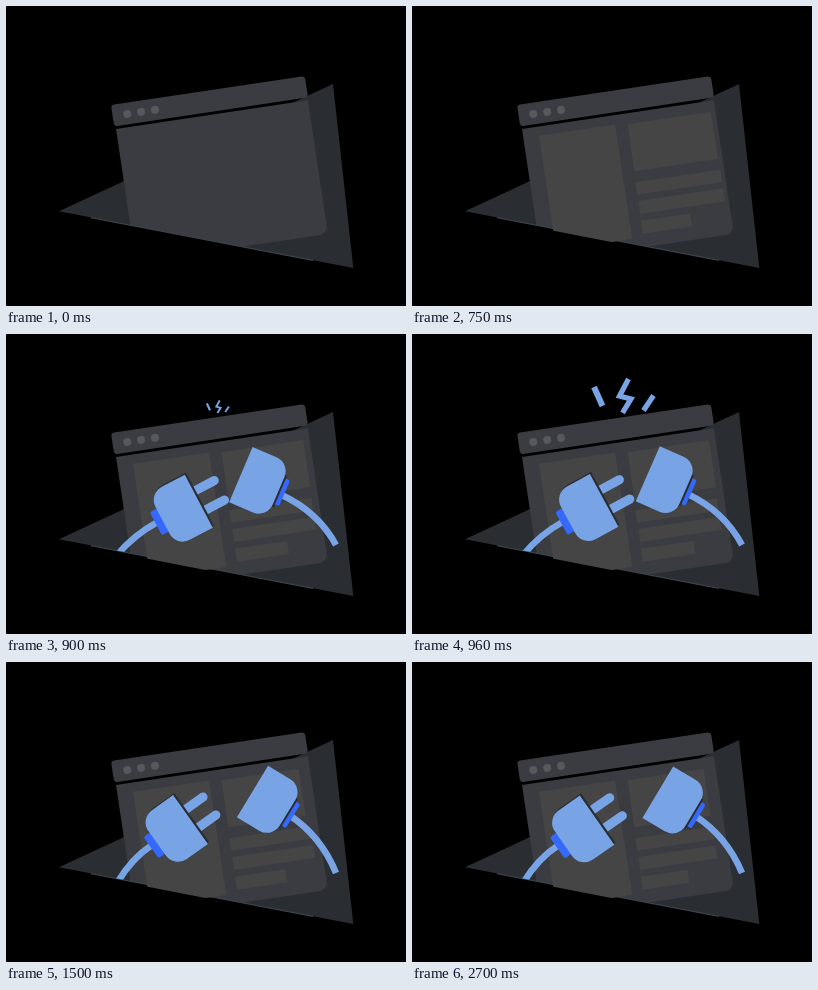
Animation of 400x300 px, one loop 2.73 s. Source, as an HTML page with a canvas:

```html
<!DOCTYPE html>
<html>
<head>
<meta charset="utf-8">
<style>
  html, body { margin: 0; height: 100%; overflow: hidden; background: #000; }
  canvas { display: block; }
</style>
</head>
<body>
<canvas id="stage" width="400" height="300"></canvas>
<script>
const ctx = document.getElementById('stage').getContext('2d');
const LOOP = 2730;
const BLUE = '#78a4e6', COLLAR = '#3469fb', SHADE = '#2a2d31';
const PANEL = '#3a3c41', BLOCK = '#454546', DOT = '#56585c';

const clamp01 = x => Math.min(1, Math.max(0, x));
const mix = (a, b, k) => a + (b - a) * k;
const smooth = x => { x = clamp01(x); return x * x * (3 - 2 * x); };
const span = (t, a, b) => clamp01((t - a) / (b - a));

const TIMES = [750, 840, 960, 1500, 2130, 2700];
function keyed(t, values) {
  let i = 0;
  while (i < TIMES.length - 2 && t > TIMES[i + 1]) i++;
  return mix(values[i], values[i + 1], span(t, TIMES[i], TIMES[i + 1]));
}

function box(x, y, w, h, radius, color) {
  ctx.fillStyle = color;
  ctx.beginPath();
  ctx.roundRect(x, y, w, h, radius);
  ctx.fill();
}

function polyline(points, width, color) {
  ctx.strokeStyle = color;
  ctx.lineWidth = width;
  ctx.beginPath();
  points.forEach(p => ctx.lineTo(...p));
  ctx.stroke();
}

function group(draw) {
  ctx.save();
  draw();
  ctx.restore();
}

// Keeps only what lies above the slanted floor.
function clipFloor(drop) {
  ctx.beginPath();
  ctx.moveTo(0, 0);
  ctx.lineTo(400, 0);
  ctx.lineTo(400, 272.3 + drop);
  ctx.lineTo(0, 194.7 + drop);
  ctx.clip();
}

function windowSpace() {
  ctx.translate(110, 123);
  ctx.rotate(-8.5 * Math.PI / 180);
}

function drawWindow(t) {
  ctx.fillStyle = SHADE;
  ctx.beginPath();
  ctx.moveTo(53, 205.3);
  ctx.lineTo(327, 78);
  ctx.lineTo(347.3, 262);
  ctx.fill();

  group(() => {
    clipFloor(0.3);
    windowSpace();
    box(-1.4, -24.5, 196, 21.6, 3, PANEL);
    for (let i = 0; i < 3; i++) box(9.4 + 14 * i, -17.2, 8, 8, 4, DOT);
    box(0, 0, 194, 135, [0, 0, 8, 0], PANEL);
  });
  polyline([[85, 211.6], [307, 254.3]], 1.2, '#3a444a');

  group(() => {
    clipFloor(2.6);
    windowSpace();
    ctx.globalAlpha = clamp01(t / 720);
    const lineWidth = keyed(t, [86, 83.5, 82.5, 82, 79, 78]);
    box(15.8, 9.2, 77, 116, 0, BLOCK);
    box(105, 10.8, keyed(t, [84.4, 83, 82.5, 78, 77.5, 77]), 47.7, 0, BLOCK);
    box(104.2, 69.5, lineWidth, 12.5, 0, BLOCK);
    box(104.2, 88.4, lineWidth, 13, 0, BLOCK);
    box(104.2, 108.4, keyed(t, [49.5, 52, 53, 51, 48, 47]), 13, 0, BLOCK);
  });
}

function drawCord(x0, y0, cx, cy, x1, y1) {
  ctx.strokeStyle = BLUE;
  ctx.lineWidth = 6.5;
  ctx.beginPath();
  ctx.moveTo(x0, y0);
  ctx.quadraticCurveTo(cx, cy, x1, y1);
  ctx.stroke();
}

function body(color) {
  box(-41, -30, 41, 60, [15, 0, 0, 15], color);
}

function drawPlug(k) {
  group(() => {
    clipFloor(0.3);
    drawCord(mix(152, 146, k), mix(188, 183, k), mix(128, 126, k), mix(201, 196, k), 111, 221);
  });
  const x = mix(193, 184.5, k), y = mix(167.5, 157.5, k);
  const angle = mix(-27.5, -35.5, k) * Math.PI / 180;
  const place = (dx, dy) => { ctx.translate(x + dx, y + dy); ctx.rotate(angle); };
  group(() => { place(1.2, -2.2); body(SHADE); });
  group(() => {
    place(0, 0);
    box(-48.5, -13, 9, 26, 2, COLLAR);
    body(BLUE);
    for (const side of [-11, 11]) box(2.2, side - 4.6, 25.6, 9.2, [0, 4.6, 4.6, 0], BLUE);
  });
}

function drawSocket(k) {
  drawCord(mix(275, 283, k), mix(161, 153, k), mix(312, 315, k), mix(178, 174, k), 330, 211);
  group(() => {
    ctx.translate(mix(234.5, 246.5, k), mix(141, 129.5, k));
    ctx.rotate(mix(22.8, 31.3, k) * Math.PI / 180);
    ctx.scale(-1, 1);
    box(-47.5, -14, 7, 28, 2, COLLAR);
    box(-43, -17, 4, 34, 0, SHADE);
    body(BLUE);
  });
}

function drawSparks(t) {
  const grow = smooth(span(t, 870, 945));
  const fade = 1 - span(t, 1020, 1110);
  if (!grow || !fade) return;
  group(() => {
    ctx.globalAlpha = fade;
    ctx.translate(212, 79 - 6 * span(t, 960, 1110));
    ctx.scale(grow, grow);
    ctx.translate(-212, -79);
    polyline([[182, 53], [190.5, 72]], 6, BLUE);
    polyline([[216.5, 45], [207.5, 62], [219, 65], [210.5, 79]], 5.2, BLUE);
    polyline([[241.5, 61.5], [231.5, 76.5]], 5.2, BLUE);
  });
}

function draw(t) {
  ctx.fillStyle = '#000';
  ctx.fillRect(0, 0, 400, 300);
  drawWindow(t);
  if (t < 810) return;
  const apart = smooth(span(t, 840, 1440)) - 0.06 * smooth(span(t, 1500, 2700));
  drawPlug(apart);
  drawSocket(apart);
  drawSparks(t);
}

function tick() {
  draw(performance.now() % LOOP);
  requestAnimationFrame(tick);
}
tick();
</script>
</body>
</html>
```
